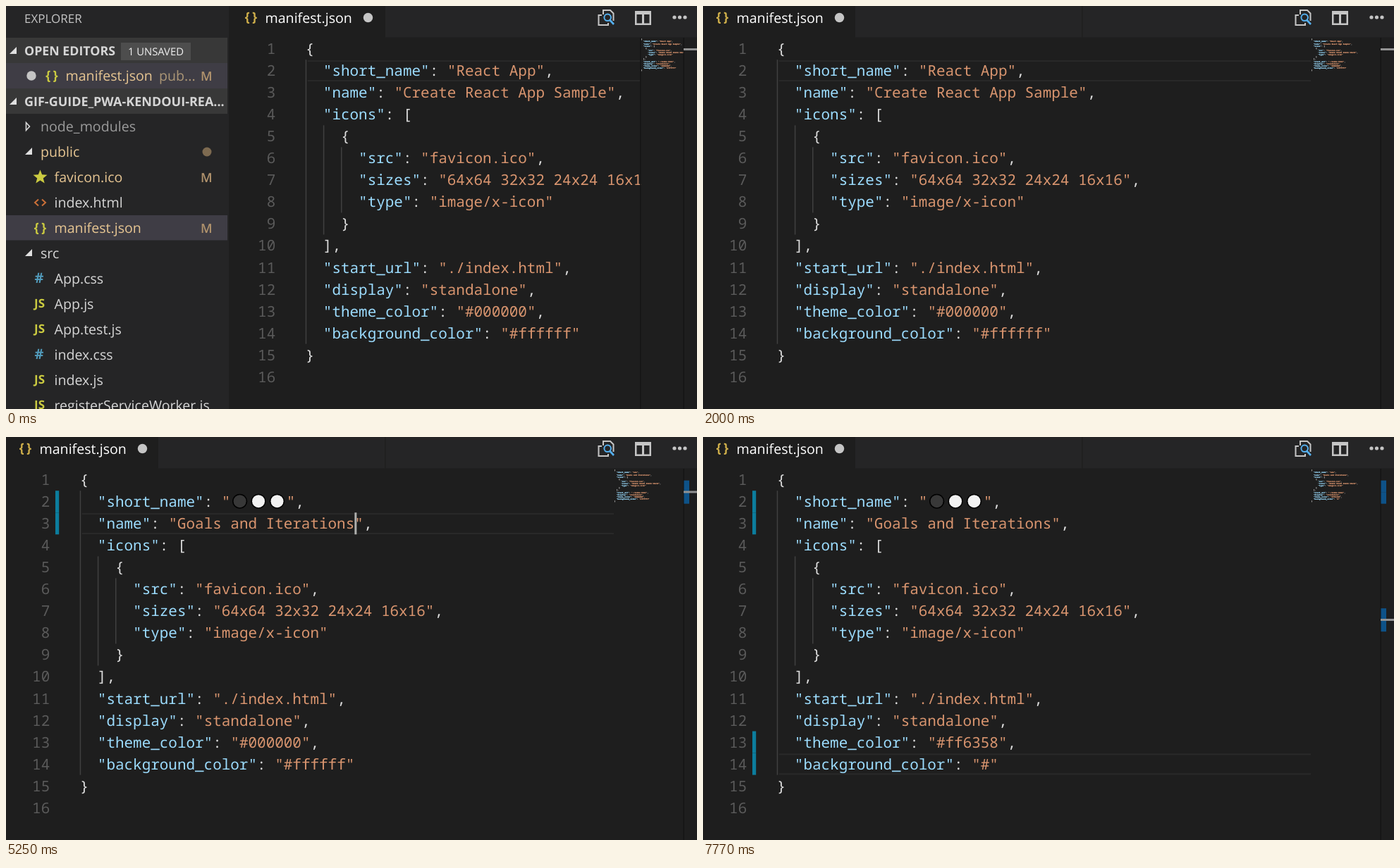
These frames come from a looping animation (980x572 px, 8000 ms). An HTML page with a canvas:

```html
<!DOCTYPE html>
<html lang="en">
<head>
<meta charset="utf-8">
<title>Editing manifest.json</title>
<style>
html, body { margin: 0; width: 100%; height: 100%; overflow: hidden; background: #1e1e1e; }
canvas { display: block; }
</style>
</head>
<body>
<canvas id="stage" width="980" height="572"></canvas>
<script>
const ctx = document.getElementById('stage').getContext('2d');
const LOOP = 8000;
const UI = '"Open Sans", "Noto Sans", sans-serif';
const MONO = '"Noto Sans Mono", "DejaVu Sans Mono", monospace';
const CELL = 12.57, LINE = 31.03, TOP = 45.2, EMOJI = 26.45;
const YELLOW = '#cbcb41', GOLD = '#e6c592', GREY = '#d6d6d6';

// Each step overrides part of the state from its time on.
const steps = [
  [0, { side: true, focus: false, row: 1, caret: false, marks: [],
        short: 'React App', name: 'Create React App Sample', theme: '#000000', back: '#ffffff' }],
  [330, { focus: true }],
  [1460, { side: false, caret: true }],
  [2000, { caret: false }],
  [2470, { caret: true }],
  [2930, { caret: false }],
  [3020, { short: '', caret: true }],
  [3250, { marks: [1] }],
  [3500, { short: 'ooo' }],
  [3950, { row: 2, name: '' }],
  [4200, { marks: [1, 2] }],
  [4350, { name: 'Goals' }],
  [4750, { name: 'Goals and' }],
  [5250, { name: 'Goals and Iterations' }],
  [5720, { row: 12, theme: '#' }],
  [5940, { marks: [1, 2, 12] }],
  [6190, { caret: false }],
  [6500, { theme: '#ff6358', caret: true }],
  [6960, { caret: false }],
  [7340, { row: 13, back: '#', caret: true }],
  [7510, { marks: [1, 2, 12, 13] }],
  [7770, { caret: false }]
];

const stateAt = t => Object.assign({}, ...steps.filter(s => s[0] <= t).map(s => s[1]));

const source = s => [
  '{',
  `  "short_name": "${s.short}",`,
  `  "name": "${s.name}",`,
  '  "icons": [',
  '    {',
  '      "src": "favicon.ico",',
  '      "sizes": "64x64 32x32 24x24 16x16",',
  '      "type": "image/x-icon"',
  '    }',
  '  ],',
  '  "start_url": "./index.html",',
  '  "display": "standalone",',
  `  "theme_color": "${s.theme}",`,
  `  "background_color": "${s.back}"`,
  '}',
  ''
];

function rect(x, y, w, h, color) {
  ctx.fillStyle = color;
  ctx.fillRect(x, y, w, h);
}

function dot(x, y, r, color) {
  ctx.fillStyle = color;
  ctx.beginPath();
  ctx.arc(x, y, r, 0, 7);
  ctx.fill();
}

function text(str, x, y, color, size = 19.6, weight = 400, family = UI) {
  ctx.font = `${weight} ${size}px ${family}`;
  ctx.fillStyle = color;
  ctx.fillText(str, x, y);
}

function path(d, color, width) {
  const p = new Path2D(d);
  if (width) {
    ctx.strokeStyle = color;
    ctx.lineWidth = width;
    ctx.stroke(p);
  } else {
    ctx.fillStyle = color;
    ctx.fill(p);
  }
}

function clipped(x, w, draw) {
  ctx.save();
  ctx.beginPath();
  ctx.rect(x, 0, w, 572);
  ctx.clip();
  draw();
  ctx.restore();
}

const braces = (x, y, color) => {
  text('{', x - 11, y + 5.5, color, 18.5, 800, MONO);
  text('}', x - 0.2, y + 5.5, color, 18.5, 800, MONO);
};

function emoji(x, y) {
  ['#383838', '#f2f2f2', '#f2f2f2'].forEach((color, i) => {
    const cx = x + EMOJI * (i + 0.5);
    dot(cx, y, 10.6, '#000');
    dot(cx, y, 9, color);
  });
}

function codeLine(line, x, y, cell, weight, withEmoji) {
  for (const m of line.matchAll(/"[^"]*"(:?)|[^\s"]+/g)) {
    const word = m[0], at = x + m.index * cell, size = cell / 0.6;
    const put = (s, dx, color) => text(s, at + dx, y, color, size, weight, MONO);
    if (word[0] !== '"') put(word, 0, '#dcdcdc');
    else if (m[1]) {
      put(word.slice(0, -1), 0, '#9cdcfe');
      put(':', (word.length - 1) * cell, '#dcdcdc');
    } else if (withEmoji && word === '"ooo"') {
      put('"', 0, '#d9956f');
      emoji(at + cell, y - 8);
      x += 3 * (EMOJI - cell);
      put('"', cell + 3 * EMOJI, '#d9956f');
    } else put(word, 0, '#d9956f');
  }
}

function toolbar() {
  const c = '#c5c5c5';
  path('M845 13H840.5V27H854V24M847 12V6H857L861.5 10.5V21', c, 2);
  path('M856.5 20L862 26', '#55b0ef', 2.6);
  path('M858 16.3a4.8 4.8 0 1 1-9.6 0a4.8 4.8 0 1 1 9.6 0', '#55b0ef', 2);
  rect(892, 7, 23, 20, c);
  rect(894.5, 12, 7.5, 12.5, '#252526');
  rect(905, 12, 7.5, 12.5, '#252526');
  for (const x of [948, 955.5, 963]) dot(x, 16, 2.6, c);
}

function editor(s) {
  const left = s.side ? 316 : 0;
  const x0 = left ? 424.7 : 104.7;
  const mapX = left ? 900 : 862;
  const lines = source(s);
  const top = TOP + s.row * LINE;

  rect(0, 0, 980, 572, '#1e1e1e');
  rect(left + (left ? 222 : 216), 0, 980, 44.5, '#252526');
  if (!left) rect(537, 0, 1.5, 44.5, '#1f1f1f');
  const tab = left ? 320 : 0;
  braces(tab + 27.5, 16, '#d0b04b');
  text('manifest.json', tab + 47.5, 23.6, '#ffffff');
  dot(tab + 193.5, 16.5, 6.7, '#c5c5c5');
  toolbar();

  rect(x0 + 3, top + 0.8, mapX - x0 - 3, 2, '#292929');
  rect(x0 + 3, top + 28.8, mapX - x0 - 3, 2, '#292929');
  for (const [col, from, to] of [[0, 1, 14], [2, 4, 9], [4, 5, 8]])
    rect(x0 + col * CELL, TOP + from * LINE, 1.5, (to - from) * LINE, '#404040');

  clipped(left, mapX - left + 1, () => lines.forEach((line, i) => {
    const y = TOP + i * LINE + 23;
    ctx.textAlign = 'right';
    text(i + 1, x0 - 42.5, y, '#5a5a5a', CELL / 0.6, 500, MONO);
    ctx.textAlign = 'left';
    codeLine(line, x0, y, CELL, 500, true);
  }));

  if (s.caret) {
    let x = x0 + lines[s.row].lastIndexOf('"') * CELL;
    if (s.row === 1 && s.short === 'ooo') x += 3 * (EMOJI - CELL);
    rect(x, top, 3, LINE, '#aeafad');
  }

  if (left) rect(899, 45, 1.5, 527, '#151515');
  // Two passes keep the tiny overview text bright.
  clipped(mapX, 961 - mapX, () => [0, 0.3].forEach(dx => lines.forEach((line, i) =>
    codeLine(line, mapX + 0.5 + dx, 48.3 + i * 3.12, 1.61, 800))));

  rect(960.5, 45, 1.2, 527, '#121212');
  const ruler = i => 45.2 + i * 16.5;
  for (const i of s.marks) {
    rect(70, TOP + i * LINE, 5.2, LINE, '#0c7d9d');
    rect(961.5, ruler(i), 7.5, 16.5, '#0e5288');
  }
  rect(961, ruler(s.row) - 1.7, 19, 3, '#929292');
}

const openArrow = (x, y) => path(`M${x + 5} ${y - 5}v10h-10z`, '#e0e0e0');

function sidebar(s) {
  const label = (str, x, y, color) => text(str, x, y + 6.8, color);
  const M = (y, color) => text('M', 276, y + 6.5, color, 18, 600);
  rect(0, 0, 316, 572, '#252526');
  text('EXPLORER', 26, 24, '#c4c4c4', 17);
  rect(0, 45, 314, 36, '#383838');
  rect(0, 81, 314, 36, '#3f3d45');
  rect(0, 117, 314, 36, '#383838');
  openArrow(10, 63);
  text('OPEN EDITORS', 26, 70, GREY, 17.8, 700);
  rect(163, 52, 99, 25, '#4d4d4d');
  text('1 UNSAVED', 173, 70, '#f0f0f0', 14.8);
  dot(36, 99, 6.7, '#c5c5c5');
  braces(65, 99, YELLOW);
  label('manifest.json', 84.5, 99, GOLD);
  label('pub...', 217, 99, '#ab9676');
  M(99, '#b1936d');
  openArrow(10, 135);
  text('GIF-GUIDE_PWA-KENDOUI-REA...', 26, 142, GREY, 18, 700);

  path('M28.5 165.5L33.5 171L28.5 176.5z', '#d8d8d8', 1.6);
  label('node_modules', 49, 171, '#9a9a9a');
  openArrow(32, 206);
  label('public', 49, 207, GOLD);
  dot(285, 207, 6.5, '#7d6a50');

  rect(0, 297, 314, 35.5, s.focus ? '#094771' : '#3f3d45');
  let star = 'M';
  for (let i = 0; i < 10; i++) {
    const a = i * Math.PI / 5, r = i % 2 ? 4.5 : 10.5;
    star += `${i ? 'L' : ''}${48.5 + r * Math.sin(a)} ${243 - r * Math.cos(a)}`;
  }
  path(star + 'z', YELLOW);
  path('M46 274.5L41 279L46 283.5M51 274.5L56 279L51 283.5', '#cc7038', 2);
  braces(48.5, 315, YELLOW);
  label('favicon.ico', 68.5, 243, GOLD);
  M(243, '#b1936d');
  label('index.html', 68.5, 279, GREY);
  label('manifest.json', 68.5, 315, s.focus ? '#ffffff' : GOLD);
  M(315, s.focus ? '#c3d0da' : '#b1936d');

  openArrow(32, 350);
  label('src', 49, 351, GREY);
  ['App.css', 'App.js', 'App.test.js', 'index.css', 'index.js', 'registerServiceWorker.js']
    .forEach((file, i) => {
      const y = 387 + i * 36;
      if (file.endsWith('css')) text('#', 40.5, y + 6, '#519aba', 20, 700);
      else text('JS', 40, y + 5, YELLOW, 17, 700);
      label(file, 68.5, y, GREY);
    });
}

function frame(now) {
  const s = stateAt(now % LOOP);
  ctx.textRendering = 'geometricPrecision';
  editor(s);
  if (s.side) clipped(0, 316, () => sidebar(s));
}

let start;
function tick(now) {
  start ??= now;
  frame(now - start);
  requestAnimationFrame(tick);
}
requestAnimationFrame(tick);
</script>
</body>
</html>
```
